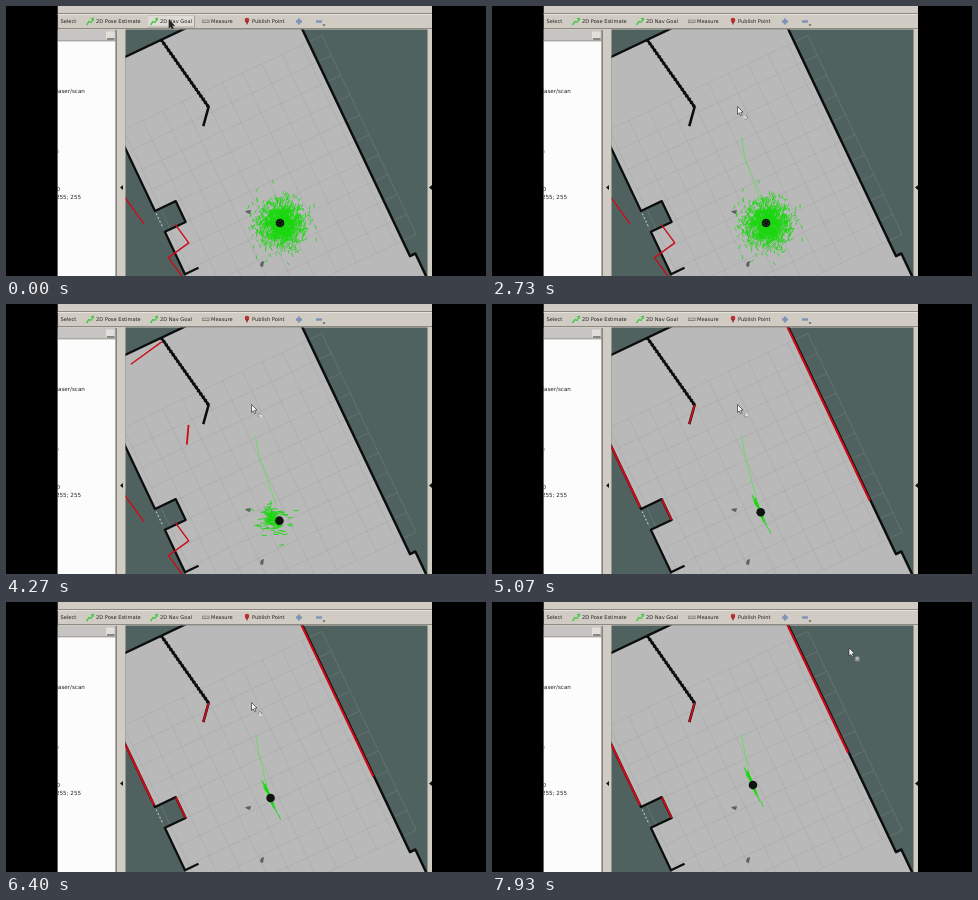
An HTML page with a canvas for the animation above (8 s loop, 480 px wide and 270 px high).

```html
<!DOCTYPE html>
<html lang="en">
<head>
<meta charset="utf-8">
<title>Robot navigation</title>
<style>
html, body { margin: 0; width: 100%; height: 100%; overflow: hidden; background: #000; }
canvas { display: block; width: 100vw; height: 100vh; }
</style>
</head>
<body>
<canvas id="stage" width="480" height="270"></canvas>
<script>
const ctx = document.getElementById('stage').getContext('2d');
const LOOP = 8000;
const PRESS = 1270, RELEASE = 1950, RESAMPLE = 4000, LOCALIZED = 4900;
const RED = '#cc0c1a', GREEN = '#18d80e', WALL = '#0c0e0e', SLATE = '#50625f', CHROME = '#d0ccc4', EDGE = '#8e8a83';

// The room is axis-aligned in its own frame: origin at a box corner, walls at these offsets
const TILT = -0.443, TOP = -152, RIGHT = 211, BOX = 23, CELL = 22;
const ROOM = { x: 149, y: 205, tilt: TILT };
const MISALIGNED = { x: 149, y: 233, tilt: TILT - 0.185 };

const TOOL = [163, 14], GOAL = [250, 131], REST = [245.5, 100.5], AWAY = [357, 46];

const ramp = (t, from, to) => Math.min(1, Math.max(0, (t - from) / (to - from)));
const smooth = p => p * p * (3 - 2 * p);
const mix = (a, b, p) => a.map((v, i) => v + (b[i] - v) * p);

function robotAt(t) {
  const p = ramp(t, 4250, 7930);
  return [274 - 13 * p ** 0.6, 217 - 34 * p ** 0.9];
}

function cursorAt(t) {
  const toGoal = mix(TOOL, GOAL, smooth(ramp(t, 500, 1240)));
  const toRest = mix(toGoal, REST, ramp(t, 1290, 1510));
  return mix(toRest, AWAY, smooth(ramp(t, 6600, 7075)));
}

function makeGauss(seed) {
  const random = () => (seed = (seed * 16807) % 2147483647) / 2147483647;
  return () => Math.sqrt(-2 * Math.log(random())) * Math.cos(2 * Math.PI * random());
}

function rect(color, x, y, w, h) {
  ctx.fillStyle = color;
  ctx.fillRect(x, y, w, h);
}

function trace(points) {
  ctx.beginPath();
  for (let i = 0; i < points.length; i += 2) ctx.lineTo(points[i], points[i + 1]);
}

function poly(color, ...points) {
  trace(points);
  ctx.fillStyle = color;
  ctx.fill();
}

function line(color, width, ...points) {
  trace(points);
  ctx.strokeStyle = color;
  ctx.lineWidth = width;
  ctx.stroke();
}

function disc(color, x, y, r) {
  ctx.fillStyle = color;
  ctx.beginPath();
  ctx.arc(x, y, r, 0, 7);
  ctx.fill();
}

function label(text, x, y, size) {
  ctx.fillStyle = '#222';
  ctx.font = `${size}px "DejaVu Sans", sans-serif`;
  ctx.fillText(text, x, y);
}

function inFrame({ x, y, tilt }, draw) {
  ctx.save();
  ctx.translate(x, y);
  ctx.rotate(tilt);
  draw();
  ctx.restore();
}

function clipTo(x, y, w, h, draw) {
  ctx.save();
  ctx.beginPath();
  ctx.rect(x, y, w, h);
  ctx.clip();
  draw();
  ctx.restore();
}

function drawRoom() {
  rect('#b9b9b9', 0, TOP, RIGHT, 340);
  rect('#b9b9b9', RIGHT - 1, 150, 7, 40);
  rect(SLATE, 0, 0, BOX, BOX);

  const right = 226, bottom = 133, size = 10 * CELL;
  for (let d = 0; d <= size; d += CELL) {
    line('rgba(146,151,149,.32)', 0.8, right - d, bottom, right - d, bottom - size);
    line('rgba(146,151,149,.32)', 0.8, right, bottom - d, right - size, bottom - d);
  }

  line(WALL, 2.4, 30, TOP, 110, TOP);
  line(WALL, 2.6, 79, TOP, 93, -71, 80, -56);
  line(WALL, 2.5, RIGHT, -105, RIGHT, 150, RIGHT + 6, 150, RIGHT + 6, 180);
  line(WALL, 2.3, 0, -75, 0, 0, BOX, 0, BOX, BOX, 0, BOX, 0, 70, 15, 70);

  // Ragged edges of the occupancy cells
  ctx.setLineDash([1.5, 2.5]);
  line(WALL, 3.6, 79, TOP, 93, -71);
  line('#c4c8c6', 1.2, 0, 3, 0, 17);
  ctx.setLineDash([]);
}

function drawObstacles() {
  poly('#5c605f', 239, 205, 245, 204, 244, 208, 241, 207);
  poly('#5c605f', 255, 256, 258, 255, 257, 261, 254, 260);
}

function drawScan(t, robotY) {
  const aligned = t >= LOCALIZED;
  const wallEnd = () => line(RED, 1.8, 93, -71, 80, -56);
  inFrame(aligned ? ROOM : MISALIGNED, () => {
    if (aligned) {
      line(RED, 2.1, RIGHT - 0.7, -105, RIGHT - 0.7, 40 + (robotY - 183) * 2);
      line(RED, 2.1, 0, -70, 0, -2);
      line(RED, 1.9, BOX, 0, BOX, BOX);
      wallEnd();
      return;
    }
    line(RED, 1.4, 0, -55, 0, -19);
    line(RED, 1.4, BOX + 2, 0, BOX + 2, BOX, 0, BOX, 0, 60);
    if (t < 3600) return;
    line(RED, 1.4, 82, TOP - 2, 120, TOP - 2);
    wallEnd();
  });
}

function cloud({ count, x, y, along, across, axis = 0, heading, turn, length, width = 0.9 }) {
  const gauss = makeGauss(4242);
  const c = Math.cos(axis), s = Math.sin(axis);
  ctx.beginPath();
  for (let i = 0; i < count; i++) {
    const u = gauss() * along, v = gauss() * across, a = heading + gauss() * turn;
    const px = x + u * c - v * s, py = y + u * s + v * c;
    ctx.moveTo(px, py);
    ctx.lineTo(px + Math.cos(a) * length, py + Math.sin(a) * length);
  }
  ctx.strokeStyle = GREEN;
  ctx.lineWidth = width;
  ctx.stroke();
}

function drawParticles(t, x, y) {
  if (t < RESAMPLE) {
    const spread = 11;
    cloud({ count: t < 3600 ? 1250 : 600, x: 275, y: 219, along: spread, across: spread,
      heading: -1.5, turn: 0.6, length: 4, width: 0.75 });
  } else if (t < LOCALIZED) {
    cloud({ count: 75, x: 267, y: 216, along: 8, across: 7, heading: 0, turn: 0.2, length: 5 });
    cloud({ count: 60, x: 266, y: 214, along: 4, across: 2.5, axis: 1.2, heading: -1.9, turn: 0.8, length: 5 });
  } else {
    cloud({ count: 40, x: x + 1, y: y + 3, along: 8, across: 0.7, axis: 1.16, heading: -1.98, turn: 0.12, length: 6 });
  }
}

function drawRobot(t, x, y) {
  disc('#101410', x, y, 4.3);
  if (t >= RESAMPLE) return;
  for (let a = 0; a < 6; a++) disc('#28742a', x + Math.cos(a) * 2.3, y + Math.sin(a) * 2.3, 0.5);
}

function drawGoalArrow(t) {
  if (t < PRESS || t >= RELEASE) return;
  inFrame({ x: GOAL[0] + 1, y: GOAL[1] - 0.5, tilt: t < 1460 ? -0.423 : -1.72 }, () => {
    rect('#10ee08', -1, -2, 44, 4);
    poly('#18d810', 43, -3, 47, -3, 54, 0, 47, 3, 43, 3);
  });
}

function drawPlan(t, x, y) {
  if (t >= 2050) line('rgba(85,228,75,.75)', 1, 249.5, 132, 253, 152, x - 3, Math.min(y, 210) - 8);
}

function drawPanels() {
  rect(CHROME, 51.5, 0, 374.5, 270);
  for (const y of [7, 22]) rect(EDGE, 51.5, y, 374.5, 1);
  rect('#e6e3dd', 51.5, 8, 374.5, 1);
  rect('#c6c5c3', 51.5, 24, 58, 11);
  rect('#fcfcfc', 51.5, 35, 58, 235);
  rect(EDGE, 51.5, 34.5, 58, 0.8);
  rect('#77746f', 109.5, 24, 1.3, 246);
  rect('#e2dfda', 100, 25.5, 8.5, 8);
  rect('#605d59', 101, 32.3, 7.5, 1.3);
  for (const x of [114, 423]) poly('#141414', x, 181.5, x + 3, 179, x + 3, 184);
  label('laser/scan', 50.4, 87, 5.6);
  label('0', 50.5, 185, 5.6);
  label('255; 255', 50, 193, 5.6);
  rect('#555', 51.5, 144, 0.8, 3);
}

function greenArrow(x, y) {
  line('#45c742', 1.3, x - 3.5, y + 3.5, x - 1, y, x + 1, y + 1, x + 3, y - 2.5);
  poly('#45c742', x + 4, y - 4, x + 3.7, y - 0.5, x + 0.5, y - 3);
}

function drawToolbar(t) {
  if (t < RELEASE) {
    const pressed = t >= 500;
    rect(EDGE, 142, 9.7, 47, 11.6);
    rect(pressed ? '#efede9' : '#dedbd5', 142, 9.7, 46.3, 11);
  }
  label('Select', 54.5, 17, 5.1);
  label('2D Pose Estimate', 90, 17, 5.1);
  label('2D Nav Goal', 154, 17, 5.1);
  label('Measure', 205, 17, 5.1);
  label('Publish Point', 246, 17, 5.1);
  for (const x of [84, 148]) greenArrow(x, 15.5);
  rect('#85857c', 196, 13.7, 7.5, 3.3);
  rect('#bdbcb2', 196.7, 14.4, 6, 1.7);
  disc('#bd3034', 241, 14, 2.3);
  poly('#a32a2e', 239.2, 15, 242.8, 15, 241, 19);
  for (const x of [290, 310]) rect('#7d93b5', x, 14.3, 6, 2.4);
  rect('#7d93b5', 291.8, 12.5, 2.4, 6);
  poly('#444', 316.5, 18.5, 319.5, 18.5, 318, 20.3);
}

function drawCursor(t) {
  const [x, y] = cursorAt(t);
  const shape = [0, 0, 0, 8, 1.8, 6.4, 3, 9, 4.4, 8.3, 3.2, 5.8, 5.6, 5.6, 0, 0];
  inFrame({ x, y, tilt: 0 }, () => {
    poly(t < 700 ? '#222' : '#f4f4f4', ...shape);
    line('#333', 0.7, ...shape);
    if (t < 2050) return;
    ctx.translate(8.3, 11);
    disc('rgba(235,235,235,.6)', 0, 0, 2.5);
    ctx.beginPath();
    ctx.arc(0, 0, 1.9, t / 160, t / 160 + 4.2);
    ctx.strokeStyle = '#666';
    ctx.lineWidth = 0.8;
    ctx.stroke();
  });
}

function render(t) {
  const [x, y] = robotAt(t);
  rect('#000', 0, 0, 480, 270);
  clipTo(51.5, 0, 374.5, 270, () => {
    drawPanels();
    drawToolbar(t);
    clipTo(119.5, 23.5, 302, 247, () => {
      rect(SLATE, 119, 23, 303, 247);
      inFrame(ROOM, drawRoom);
      drawObstacles();
      drawScan(t, y);
      drawPlan(t, x, y);
      drawParticles(t, x, y);
      drawRobot(t, x, y);
      drawGoalArrow(t);
    });
    drawCursor(t);
  });
}

const start = performance.now();
function tick() {
  render((performance.now() - start) % LOOP);
  requestAnimationFrame(tick);
}
ctx.lineJoin = 'round';
tick();
</script>
</body>
</html>
```
